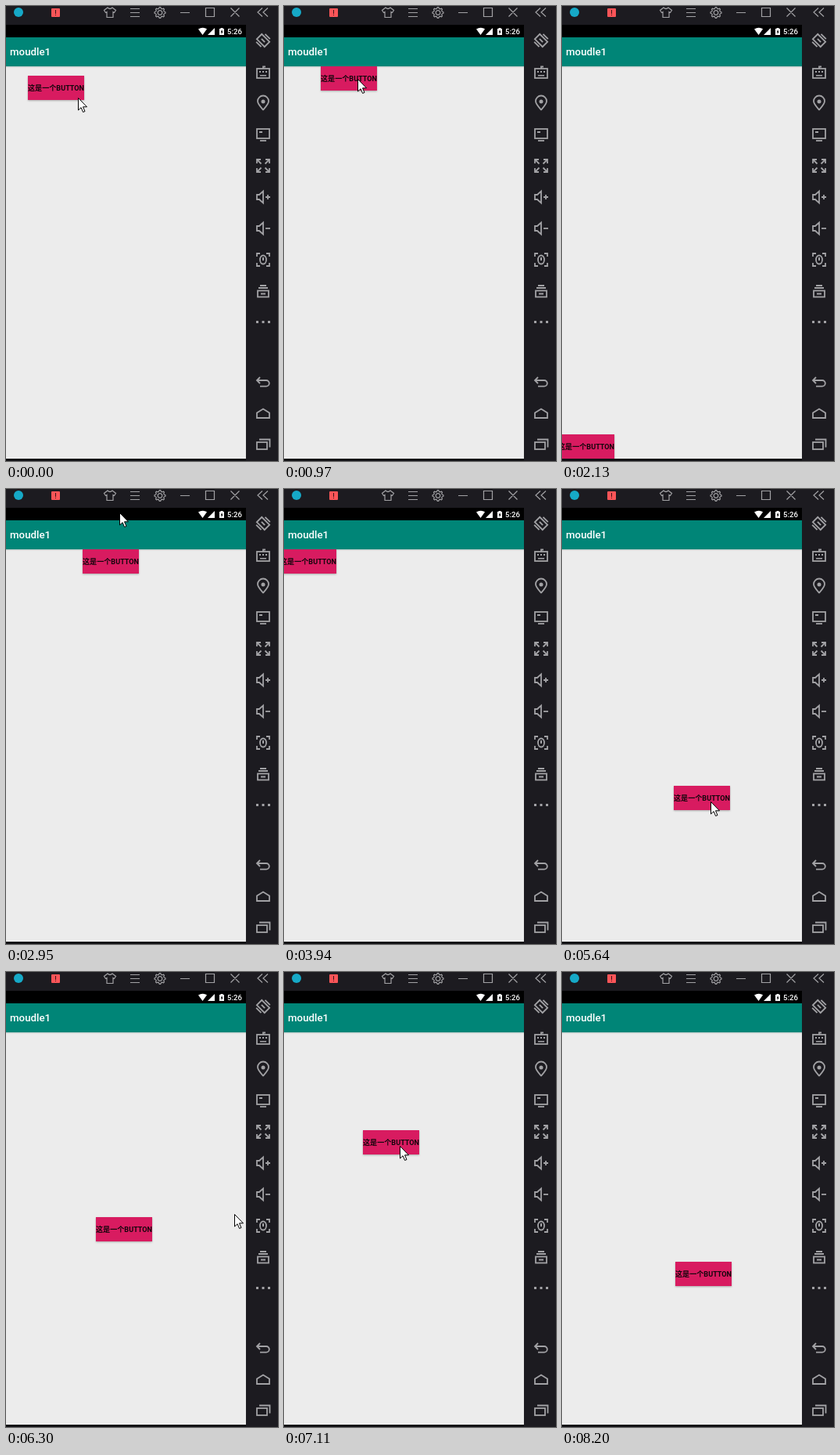
An HTML page for the animation above (8.58 s loop, 348 px wide and 581 px high).

```html
<!DOCTYPE html>
<html lang="zh-CN">
<head>
<meta charset="utf-8">
<title>Drag button</title>
<style>
  html, body { margin: 0; width: 100%; height: 100%; overflow: hidden; background: #1c1b20; }
  svg { display: block; }
  text { font-family: Roboto, "Noto Sans CJK SC", "Noto Sans CJK", sans-serif; font-weight: 500; }
  .line { fill: none; stroke: #a2a2a5; }
  .line .solid { fill: #a2a2a5; stroke: none; }
  #face { filter: drop-shadow(0 1px .8px rgba(0, 0, 0, .28)); }
</style>
</head>
<body>
<svg width="348" height="581" viewBox="0 0 348 581">
  <clipPath id="screen"><rect y="77" width="307" height="501"/></clipPath>
  <rect width="348" height="581" fill="#1c1b20"/>
  <rect y="24" width="307" height="16" fill="#000"/>
  <rect y="578" width="307" height="3" fill="#111115"/>

  <!-- page -->
  <rect y="77" width="307" height="501" fill="#ececec"/>
  <rect y="77" width="307" height="1" fill="#c4cfcd"/>
  <rect y="78" width="307" height="1" fill="#dfe2e1"/>
  <rect y="40" width="307" height="37" fill="#008577"/>
  <text x="5" y="63" font-size="13.3" fill="#fff">moudle1</text>
  <g clip-path="url(#screen)">
    <g id="button">
      <rect id="face" width="72" height="31" fill="#d81b60"/>
      <text x="36" y="19" font-size="9.1" text-anchor="middle" style="font-weight:600" fill="#14060c">这是一个BUTTON</text>
    </g>
  </g>

  <!-- status bar -->
  <g fill="#fff">
    <path d="M246 29.500Q251.500 26 257 29.500L251.500 37Z"/>
    <path d="M267 28V37H258Z"/>
    <path d="M273 29H274.500V28H277.500V29H279V37H273Z"/>
    <path d="M276.500 30L274.500 33.500H275.700V36L277.700 32.500H276.500Z" fill="#000"/>
    <text x="283" y="36" font-size="9.6">5:26</text>
  </g>

  <!-- title bar -->
  <circle cx="16" cy="8" r="6" fill="#16a9c7"/>
  <rect x="58" y="3" width="11" height="11" rx="1" fill="#fb5558"/>
  <path d="M63 5h1v5h-1zM63 11h1v1h-1z" fill="#3c1418"/>
  <g class="line" stroke-width="1.2">
    <path d="M130 2L125.500 5.500L127.500 8.500L129 7.500V14.500H137V7.500L138.500 8.500L140.500 5.500L136 2Q133 5 130 2Z"/>
    <path d="M159 3.500h12m-12 5h12m-12 5h12"/>
    <g id="gear" transform="translate(197 8.500)"><circle r="2.800"/></g>
    <path d="M223 8.500h12M255.500 2.500h11v11h-11zM287.500 2.500l11 11m0 -11l-11 11"/>
    <path d="M328 2.500l-6 5.500l6 5.500m7 -11l-6 5.500l6 5.500"/>
  </g>

  <g id="tools" class="line" stroke-width="1.8"></g>
  <path id="cursor" d="M.5 .5V16L4.100 12.700L6.600 18.500L9 17.500L6.500 11.800H11.500Z" fill="#fff" stroke="#000"/>
</svg>
<script>
const $ = id => document.getElementById(id);

// Icon helpers; each icon is drawn around its own centre
const path = (d, attrs = "") => `<path d="${d}" ${attrs}/>`;
const rect = (x, y, w, h, attrs = "") => `<rect x="${x}" y="${y}" width="${w}" height="${h}" ${attrs}/>`;
const solid = (x, y, w, h) => rect(x, y, w, h, 'class="solid"');
const trio = (gap, y, size) => [-1, 0, 1].map(i => solid(i * gap - size / 2, y, size, size)).join("");
const corners = d => [0, 90, 180, 270].map(a => path(d, `transform="rotate(${a})"`)).join("");
const speaker = path("M-8 -3h3l5 -4.500v15l-5 -4.500h-3z");

const toolIcons = [
  `<g transform="rotate(45)">${rect(-7, -4.5, 14, 9)}${path("M-5 7.500H4M5 -7.500H-4")}${solid(-3, -1, 6, 2)}</g>`,
  rect(-8, -4, 16, 12) + path("M0 -4v-2.500h3") + trio(4, -1, 2) + solid(-4, 4, 8, 1.5),
  path("M0 8.500C-4 4 -7 1 -7 -2.500A7 7 0 0 1 7 -2.500C7 1 4 4 0 8.500Z") + '<circle class="solid" cy="-2" r="2.500"/>',
  rect(-8, -7, 16, 12) + path("M-4 8h8") + solid(-5, -4, 4, 2),
  corners("M3 -8h5v5M8 -8l-5.500 5.500"),
  speaker + path("M3 0h6m-3 -3v6"),
  speaker + path("M3 0h6"),
  corners("M4 -8h4v4") + '<ellipse rx="4" ry="5.500"/>' + solid(-1, -3, 2, 4),
  path("M-4 -7h8M-6 -4h12") + rect(-7, -.5, 14, 8) + solid(-3, 2.5, 6, 2),
  trio(7.5, -2, 3)
];
const navIcons = [
  path("M-4 -6l-4 4l4 4m-4 -4h12a3.800 3.800 0 0 1 0 7.600h-8"),
  path("M-8 6v-6.500l8 -5l8 5v6.500z"),
  rect(-8, -3, 13, 9) + path("M-5 -6.500h13.500v10")
];
const column = (icons, top) => icons.map((icon, i) =>
  `<g transform="translate(329 ${top + 40 * i})">${icon}</g>`).join("");
$("tools").innerHTML = column(toolIcons, 44) + column(navIcons, 480);

// Eight-toothed cog outline
const cog = Array.from({ length: 32 }, (_, i) => {
  const r = i % 4 < 2 ? 7 : 5.4, a = (i - .5) * Math.PI / 16;
  return `${(r * Math.sin(a)).toFixed(2)} ${(-r * Math.cos(a)).toFixed(2)}`;
});
$("gear").insertAdjacentHTML("beforeend", path(`M${cog.join("L")}Z`));

// Pointer strokes: the pointer runs through a few key points in equal steps
const LOOP = 8580, BEAT = 140;
const drag = (start, end, ...keys) => ({ start, end, keys, held: true });
const hover = (start, end, ...keys) => ({ start, end, keys, held: false });
const strokes = [
  hover(0, 0, [92, 117]),
  drag(120, 970, [75, 109], [202, 270], [94, 93]),
  drag(1250, 2260, [130, 88], [329, 140], [200, 640], [-250, 520]),
  drag(2400, 3230, [-40, 360], [-20, 30], [309, 30], [309, 640]),
  drag(3530, 3530, [-80, 640]),
  drag(3940, 3940, [-80, -40]),
  drag(4340, 4340, [400, -40]),
  drag(4650, 5070, [295, 110], [210, 223]),
  drag(5210, 5640, [40, 276], [90, 459], [190, 399]),
  drag(5770, 6170, [120, 350], [42, 240], [80, 113], [162, 333]),
  hover(6300, 6560, [292, 309], [200, 345]),
  drag(6690, 6810, [162, 333], [145, 325]),
  drag(6960, 7660, [128, 270], [177, 150], [192, 390]),
  hover(7800, 8200, [270, 480], [326, 548], [330, 600])
];

const clamp = (v, lo, hi) => Math.min(hi, Math.max(lo, v));

// Point at share p (0 to 1) of a polyline
function along(keys, p) {
  const u = p * (keys.length - 1), i = Math.floor(u);
  const a = keys[i], b = keys[i + 1] || a;
  return a.map((v, k) => Math.round(v + (b[k] - v) * (u - i)));
}

function pointer({ start, end, keys }, t) {
  const steps = Math.round((end - start) / BEAT);
  if (!steps) return keys[0];
  const step = Math.floor((t - start) / (end - start) * steps + 1e-6);
  return along(keys, Math.min(step, steps) / steps);
}

const place = (id, x, y) => $(id).setAttribute("transform", `translate(${x} ${y})`);

function draw(t) {
  const past = strokes.filter(s => s.start <= t);
  const grip = past.findLast(s => s.held);
  const [x, y] = grip ? pointer(grip, t) : strokes[1].keys[0];
  place("button", clamp(x - 47, -5, 235), clamp(y - 20, 77, 547));
  place("cursor", ...pointer(past.at(-1), t));
}

const begin = performance.now();
function tick() {
  draw(Math.max(0, performance.now() - begin) % LOOP);
  requestAnimationFrame(tick);
}
tick();
</script>
</body>
</html>
```
